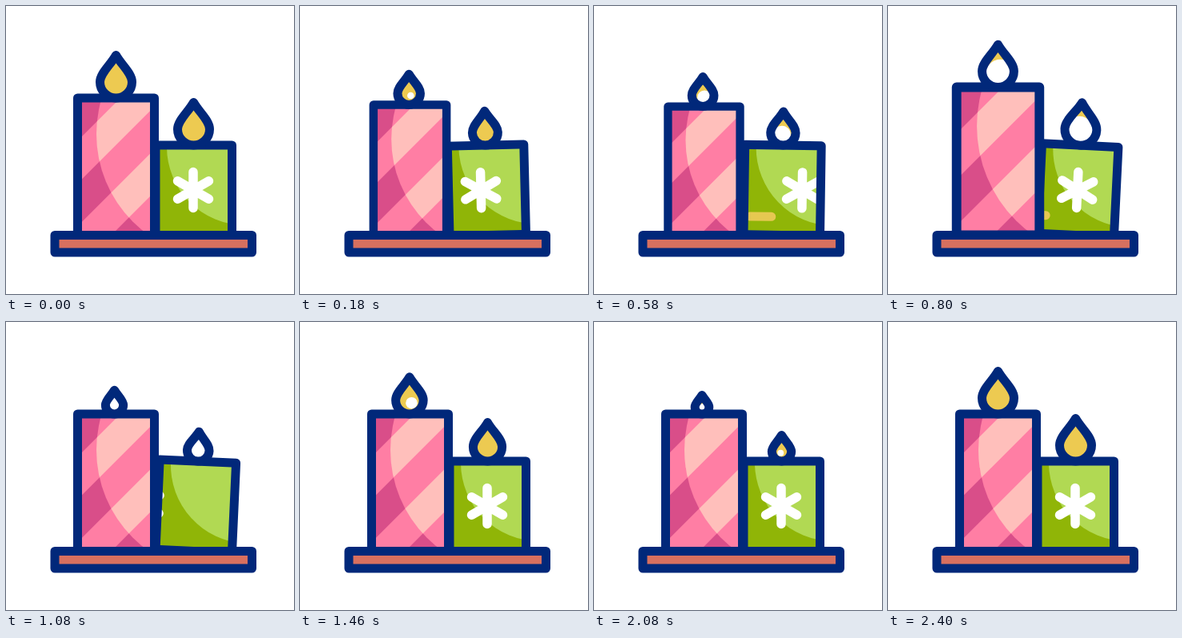
Write an HTML page that moves like this. It is 360 by 360 pixels and loops after 2.42 s.

```html
<!DOCTYPE html>
<html lang="en">
<head>
<meta charset="utf-8">
<title>Candles</title>
<style>
html, body { margin: 0; width: 100%; height: 100%; overflow: hidden; background: #fff; }
svg { display: block; width: 100vw; height: 100vh; }
.line { fill: none; stroke: #01287a; stroke-width: 11; stroke-linejoin: round; stroke-linecap: round; }
.flame { vector-effect: non-scaling-stroke; }
</style>
</head>
<body>
<svg viewBox="0 0 360 360">
  <defs>
    <path id="drop" d="M0-53.5C7-41 20-31 20-20A20 20 0 0 1-20-20C-20-31-7-41 0-53.5Z"/>
    <path id="star" d="M0-22.5V22.5M-19.5-11.2L19.5 11.2M-19.5 11.2L19.5-11.2"/>
    <clipPath id="dropClip"><use href="#drop"/></clipPath>
    <clipPath id="tallClip"><rect x="89.500" y="115" width="96" height="171.500"/></clipPath>
    <clipPath id="shortClip"><rect x="187" y="174" width="95.500" height="112.500"/></clipPath>
    <clipPath id="lit"><circle cx="268" cy="160" r="155"/></clipPath>
  </defs>

  <g id="short">
    <g clip-path="url(#shortClip)">
      <rect x="187" y="174" width="96" height="113" fill="#90b507"/>
      <circle cx="299" cy="176" r="98" fill="#b1d953"/>
      <g id="strip" fill="none" stroke="#fff" stroke-width="11.500" stroke-linecap="round">
        <use href="#star" x="234" y="230"/>
        <use href="#star" x="382" y="230"/>
        <use href="#star" x="530" y="230"/>
        <path d="M317 263.500H344" stroke="#e6c851" stroke-width="11"/>
      </g>
    </g>
    <rect class="line" x="187" y="174" width="95.500" height="112.500"/>
    <g id="shortFlame"></g>
  </g>

  <g id="tall">
    <g clip-path="url(#tallClip)">
      <rect x="89" y="115" width="97" height="172" fill="#d94e89"/>
      <g id="darkStripes" stroke="#ff7ea4" stroke-width="37.700"></g>
      <g clip-path="url(#lit)">
        <rect x="89" y="115" width="97" height="172" fill="#ff7ea4"/>
        <g id="lightStripes" stroke="#ffbfbb" stroke-width="37.700"></g>
      </g>
    </g>
    <rect class="line" x="89.500" y="115" width="96" height="171.500"/>
  </g>
  <g id="tallFlame"></g>

  <rect class="line" x="61" y="286.500" width="246.500" height="21.500" style="fill:#d8705f"/>
</svg>
<script>
const LOOP = 2420, BASE = 286.5, STEP = 148;
const $ = id => document.getElementById(id);

const sine = p => (1 - Math.cos(Math.PI * p)) / 2;
const smoother = p => p * p * p * (p * (p * 6 - 15) + 10);
const linear = p => p;

// Each track is a list of [time, value] steps.
const flicker = [[0, 1], [380, .38], [780, 1], [1190, .47], [1600, 1], [2000, .38], [2400, 1]];
const stretch = [[0, 1], [430, .87], [820, 1.08], [1060, 1]];
const sway = [[0, 0], [220, -1.5], [940, 3.2], [1440, 0]];
const slide = [[40, 0], [820, -STEP], [1380, -2 * STEP]];
const tallGlow = [[0, 0], [140, 0], [180, 6], [580, 13], [1080, 26], [1460, 8.5],
  [1600, 0], [1740, 8.5], [2000, 16], [2260, 8], [2360, 0]];
const shortGlow = [[300, 0], [580, 14], [1080, 26], [1300, 0], [1850, 0], [2000, 14], [2150, 0]];

function at(track, t, ease = sine) {
  if (t <= track[0][0]) return track[0][1];
  for (let i = 1; i < track.length; i++) {
    const [t0, v0] = track[i - 1], [t1, v1] = track[i];
    if (t < t1) return v0 + (v1 - v0) * ease((t - t0) / (t1 - t0));
  }
  return track[track.length - 1][1];
}

for (const id of ["darkStripes", "lightStripes"]) {
  // Diagonal bands along x + y = sum
  $(id).innerHTML = [284.7, 391.4]
    .map(sum => `<path d="M40 ${sum - 40}L240 ${sum - 240}"/>`).join("");
}

function makeFlame(id, glowX, glowY) {
  const g = $(id);
  g.innerHTML = `<use href="#drop" fill="#edca51"/>
    <g clip-path="url(#dropClip)"><circle cx="${glowX}" cy="${glowY}" fill="#fff"/></g>
    <path class="line" d="${$("drop").getAttribute("d")}"/>`;
  const glow = g.querySelector("circle"), line = g.querySelector(".line");
  return (x, y, s, r) => {
    g.setAttribute("transform", `translate(${x} ${y}) scale(${s})`);
    glow.setAttribute("r", r);
    line.style.strokeWidth = 11 / s;
  };
}
const tallFlame = makeFlame("tallFlame", 3, -16);
const shortFlame = makeFlame("shortFlame", -2, -17);

function draw(t) {
  const s = at(flicker, t), k = at(stretch, t);
  $("tall").setAttribute("transform", `translate(137.5 ${BASE}) scale(${k}) translate(-137.5 ${-BASE})`);
  tallFlame(137.5 - 4.5 * (1 - s), BASE - 171.5 * k, s, at(tallGlow, t, linear));

  $("short").setAttribute("transform", `rotate(${at(sway, t)} 234.75 ${BASE})`);
  $("strip").setAttribute("transform", `translate(${at(slide, t, smoother)} 0)`);
  shortFlame(234.5, 174, 1 - .7 * (1 - s), at(shortGlow, t, linear));
}

const start = performance.now();
function tick(now) {
  draw(Math.max(0, now - start) % LOOP);
  requestAnimationFrame(tick);
}
draw(0);
requestAnimationFrame(tick);
</script>
</body>
</html>
```
